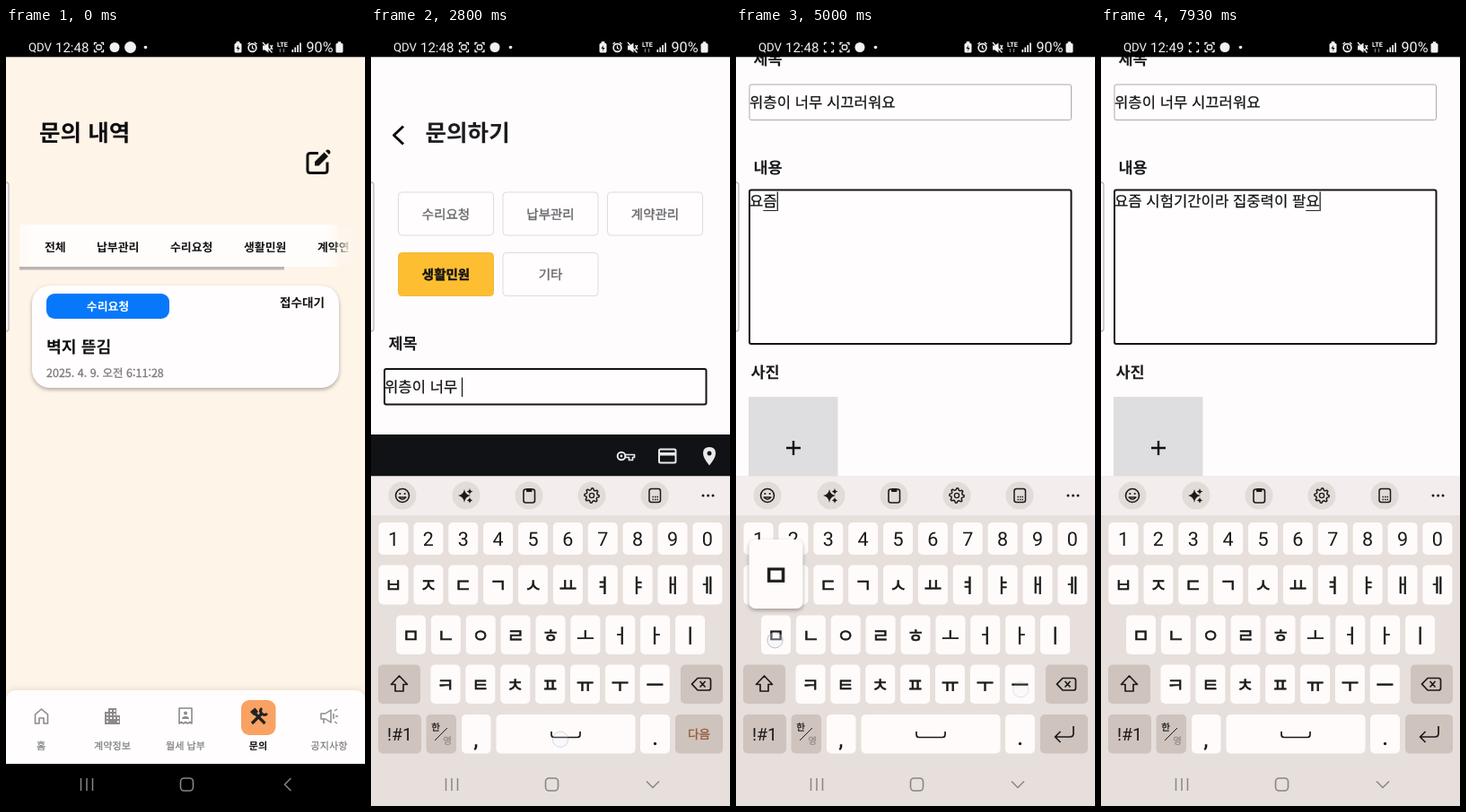
An HTML page for the animation above (8000 ms loop, 400x867 px).

```html
<!DOCTYPE html>
<html lang="ko">
<head>
<meta charset="utf-8">
<title>문의하기</title>
<style>
html, body { margin: 0; width: 100%; height: 100%; overflow: hidden; background: #000; }
svg { display: block; width: 100%; height: 100%; }
text { font-family: "Noto Sans CJK KR", "Noto Sans CJK JP", "Noto Sans CJK", sans-serif; white-space: pre; text-rendering: geometricPrecision; fill: currentColor; stroke: currentColor; }
.num { font-family: Roboto, "Open Sans", sans-serif; stroke: none; }
.lift { filter: drop-shadow(0 2px 2px rgba(60, 50, 50, .4)); }
</style>
</head>
<body>
<svg id="stage" viewBox="0 0 400 867" preserveAspectRatio="none"></svg>
<script>
const LOOP = 8000;
const $ = id => document.getElementById(id);

// ---- drawing helpers ----
const rect = (x, y, w, h, r, fill, more = '') =>
  `<rect x="${x}" y="${y}" width="${w}" height="${h}" rx="${r}" fill="${fill}" ${more}/>`;
const line = (d, color, w = 1.6, fill = 'none', more = '') =>
  `<path d="${d}" stroke="${color}" stroke-width="${w}" fill="${fill}" stroke-linejoin="round" ${more}/>`;
const fill = (d, color) => `<path d="${d}" fill="${color}" fill-rule="evenodd"/>`;
const dot = (x, y, r, color, more = '') => `<circle cx="${x}" cy="${y}" r="${r}" fill="${color}" ${more}/>`;
// Lighter weights get a hairline stroke, which gives a medium weight.
const text = (s, x, cy, size, color = '#111', weight = 400, anchor = 'start', more = '') =>
  `<text x="${x}" y="${cy + size * .38}" font-size="${size}" color="${color}" font-weight="${weight}" stroke-width="${weight < 700 ? size * (weight - 300) / 8000 : 0}" text-anchor="${anchor}" ${more}>${s}</text>`;
const num = (s, x, cy, size, color, anchor = 'start', more = '') =>
  `<text class="num" x="${x}" y="${cy + size * .356}" font-size="${size}" color="${color}" text-anchor="${anchor}" ${more}>${s}</text>`;
const group = (id, body, more = '') => `<g id="${id}" ${more}>${body}</g>`;

// ---- list page ----
function listPage() {
  const gray = '#8b8a8d';
  const tabs = [['전체', 43], ['납부관리', 101], ['수리요청', 183], ['생활민원', 265], ['계약연', 347]];
  const labels = [['홈', 39], ['계약정보', 118.5], ['월세 납부', 200], ['문의', 281], ['공지사항', 360]];
  return rect(0, 32, 400, 788, 0, '#fef4e8')
    + text('문의 내역', 37, 116, 25.6, '#0d0d10', 700)
    + line('M348 139.500h-9q-3 0-3 3v16q0 3 3 3h16q3 0 3-3v-9', '#111', 3)
    + fill('M344 153.500v-4.500l10.500-10.500 4.500 4.500-10.500 10.500zM356 137l2-1.500q3.500 0 3.500 3.500l-1.500 2z', '#111')
    + rect(15, 219, 355, 47, 2, 'url(#fade)')
    + tabs.map(([s, x]) => text(s, x, 244, 12.9, '#111', 700)).join('')
    + rect(362, 222, 26, 42, 0, 'url(#veil)')
    + rect(15, 266, 295, 3.5, 0, '#bab5b4')
    + rect(29, 287, 342, 114, 20, '#fffdfd', 'class="lift"')
    + rect(45, 296, 137, 28, 9, '#0878fa')
    + text('수리요청', 113.5, 310, 12.9, '#fff', 700, 'middle')
    + text('접수대기', 355, 306, 13.6, '#111', 700, 'end')
    + text('벽지 뜯김', 45, 355, 18.3, '#111', 700)
    + text('2025. 4. 9. 오전 6:11:28', 45, 384, 12.5, '#7d7a7a', 500)
    + rect(0, 738, 400, 100, 11, '#fffdfd', 'style="filter:drop-shadow(0 -2px 3px rgba(120,90,60,.13))"')
    + rect(262, 749, 38.5, 39, 9, '#f9a263')
    + line('M32.500 765l7-6 7 6v10h-4.500v-6h-5v6h-4.500z', gray)
    + fill('M110 762h4v-4h9v8h4v10h-17zM112 764v2h2v-2zM112 768v2h2v-2zM112 772v2h2v-2zM116 760v2h2v-2zM116 764v2h2v-2zM116 768v2h2v-2zM120 760v2h2v-2zM120 764v2h2v-2zM120 768v2h2v-2zM124 768v2h2v-2zM124 772v2h2v-2z', gray)
    + line('M193 758h14v17l-2.300-1.500-2.300 1.500-2.400-1.500-2.400 1.500-2.300-1.500-2.300 1.500z', gray)
    + dot(200, 763.5, 2, gray) + fill('M196 770q0-3 4-3t4 3z', gray)
    + line('M274 775l11-11M277.500 764l11 11', '#222', 3.2)
    + line('M272.500 762l5-4 3 4-4 4z', '#222', 1, '#222')
    + line('M285 758q-3 3 0 6t6 0', '#222', 3)
    + line('M351 764h5l6-4v14l-6-4h-5zM354 770v5M365 764v6M366 761l3-2M367 767h3M366 773l3 2', gray, 1.5)
    + labels.map(([s, x]) => text(s, x, 800, 11.1, s == '문의' ? '#111' : '#777', s == '문의' ? 700 : 400, 'middle')).join('');
}

// ---- form page ----
function formPage() {
  const choice = (s, x, y, id = '') => rect(x, y, 106, 48, 4, '#fffdfe', `stroke="#dddce1" ${id && `id="${id}"`}`)
    + text(s, x + 53, y + 24, 14.5, '#68676b', 500, 'middle', id && `id="${id}Text"`);
  return line('M36 109.500l-10.500 10 10.500 10', '#0d0d10', 3)
    + text('문의하기', 60.5, 116, 25.6, '#1c1c20', 700)
    + choice('수리요청', 30.5, 183) + choice('납부관리', 147, 183) + choice('계약관리', 263.5, 183)
    + choice('생활민원', 30.5, 250.5, 'pick') + choice('기타', 147, 250.5)
    + text('제목', 19.5, 351.5, 17.5, '#1a1a1e', 700)
    + rect(15, 380, 358.5, 39.5, 2, '#fffdfe', 'id="titleBox"')
    + text('내용', 19.5, 472.5, 17.5, '#1a1a1e', 700)
    + rect(15, 497.5, 358.5, 171.5, 2, '#fffdfe', 'id="bodyBox"')
    + text('사진', 16.5, 700.5, 17.5, '#1a1a1e', 700)
    + rect(14, 728, 99.5, 110, 0, '#dedde0')
    + line('M56 785h16M64 777v16', '#111', 2.4)
    + text('', 15, 400, 16.67, '#111', 400, 'start', 'id="titleText"')
    + text('', 15, 510, 16.67, '#111', 400, 'start', 'id="bodyText"')
    + rect(0, 0, 0, 1, 0, '#222', 'id="under"')
    + rect(0, 0, 1.2, 21.5, 0, '#111', 'id="caret"');
}

// ---- keyboard ----
const KEYS = [];
const ROWS = [['1234567890', 25, 551, 36], ['ㅂㅈㄷㄱㅅㅛㅕㅑㅐㅔ', 25, 598.5, 44], ['ㅁㄴㅇㄹㅎㅗㅓㅏㅣ', 44.5, 654.5, 43.5], ['ㅋㅌㅊㅍㅠㅜㅡ', 83, 709.5, 43.5]];
for (const [chars, x0, y, h] of ROWS)
  [...chars].forEach((c, i) => KEYS.push({ c, x: x0 + i * 38.88, y, w: 33, h }));
const addKey = (c, x, y, w, dark) => KEYS.push({ c, x: x + w / 2, y, w, h: 43.5, dark, mute: true });
addKey('⇧', 8, 709.5, 47, true);
addKey('⌫', 345, 709.5, 47, true);
addKey('!#1', 8, 765, 48, true);
addKey('lang', 61.5, 765, 33.5, true);
addKey(',', 101, 765, 32.5);
addKey(' ', 139.5, 765, 155);
addKey('.', 300, 765, 33);
addKey('go', 339, 765, 53, true);

const TENSE = { 'ㅂ': 'ㅃ', 'ㅈ': 'ㅉ', 'ㄷ': 'ㄸ', 'ㄱ': 'ㄲ', 'ㅅ': 'ㅆ', 'ㅐ': 'ㅒ', 'ㅔ': 'ㅖ' };
const keyColor = k => k.dark ? '#cfc3bd' : '#fefbfa';
const keyIndex = c => KEYS.findIndex(k => k.c == c || TENSE[k.c] == c);

function keyboard() {
  const ink = '#1b1a1a';
  const tools = [35, 106, 176, 246, 316].map(x => dot(x, 521, 15.6, '#e3dbd8')).join('');
  const gear = Array.from({ length: 32 }, (_, i) => {
    const a = i / 32 * Math.PI * 2, r = Math.floor(i / 2) % 2 ? 6.2 : 8.2;
    return (246 + r * Math.cos(a)).toFixed(1) + ' ' + (521 + r * Math.sin(a)).toFixed(1);
  }).join('L');
  const caps = KEYS.map((k, i) => rect(k.x - k.w / 2, k.y, k.w, k.h, 5, keyColor(k), `id="k${i}"`)
    + (k.mute ? '' : k.h == 36 ? num(k.c, k.x, 569.5, 21.5, ink, 'middle')
      : text(k.c, k.x, k.y + 22.5, 21.5, ink, 500, 'middle', `id="c${i}"`))).join('');
  return rect(0, 499.5, 400, 368, 0, '#e6dfdc') + rect(0, 499.5, 400, 43.5, 0, '#f3eeed')
    + tools
    + dot(35, 521, 7.5, 'none', `stroke="${ink}" stroke-width="1.6"`) + dot(32.3, 519, 1.1, ink) + dot(37.7, 519, 1.1, ink)
    + line('M31 523q4 4.500 8 0z', ink, 1.3)
    + fill('M104 514q1 6 7 7-6 1-7 8-1-7-7-8 6-1 7-7zM110 513q.5 3 3.500 3.500-3 .5-3.500 3.500-.5-3-3.500-3.500 3-.5 3.500-3.500zM110 523q.5 3 3 3.500-2.500.5-3 3-.5-2.500-3-3 2.500-.5 3-3.500z', ink)
    + rect(170, 514, 12.5, 15, 2.5, 'none', `stroke="${ink}" stroke-width="1.6"`) + rect(173, 513, 6.5, 4, 1, ink)
    + line('M' + gear + 'z', ink, 1.5) + dot(246, 521, 2.6, 'none', `stroke="${ink}" stroke-width="1.4"`)
    + rect(310, 513.5, 12.5, 15, 2.5, 'none', `stroke="${ink}" stroke-width="1.5"`)
    + line('M313.500 522.500h6.500M313.500 525.500h6.500', ink, 1.6, 'none', 'stroke-dasharray="1.5 1"')
    + [370, 375.6, 381].map(x => dot(x, 521, 1.5, ink)).join('')
    + caps
    + line('M31.500 722l9 9.500h-4.500v7.500h-9v-7.500h-4.500z', ink, 1.7)
    + line('M364 724.500h12q2.500 0 2.500 2.500v8.500q0 2.500-2.500 2.500h-12l-6.500-6.800zM366.500 728l6 6.500M372.500 728l-6 6.500', ink, 1.7)
    + num('!#1', 32, 787, 19.5, ink, 'middle')
    + text('한', 72, 779, 10.5, ink, 500, 'middle') + text('영', 85, 794, 10.5, '#8f8680', 400, 'middle')
    + line('M71 794l14-14', ink, 1)
    + num(',', 117, 792, 24, ink, 'middle', 'font-weight="500"') + num('.', 316.5, 790, 24, ink, 'middle', 'font-weight="500"')
    + line('M201 784v3.500q0 3 3 3h26q3 0 3-3v-3.500', ink, 1.7)
    + group('next', text('다음', 365.5, 787, 13.6, '#985a3c', 500, 'middle'))
    + group('enter', line('M376 778v8q0 4-4 4h-16M361.500 784l-6 6 6 6', ink, 1.7));
}

function fillBar() {
  const c = '#e9e9eb';
  return rect(0, 453, 400, 47, 0, '#101216')
    + dot(279, 477, 4.3, 'none', `stroke="${c}" stroke-width="2"`) + dot(279, 477, 1.4, c)
    + line('M283 475.500h10.500v3h-2v3h-4v-3h-4.500', c, 1.7)
    + rect(321, 469.5, 18.5, 15, 1.5, 'none', `stroke="${c}" stroke-width="2"`) + rect(321, 473, 18.5, 3.5, 0, c)
    + fill('M377 467q7 0 7 7 0 5-7 13.500-7-8.500-7-13.500 0-7 7-7zM377 471.500a2.500 2.500 0 1 0 .01 0z', c);
}

function statusBar() {
  const w = '#f2f2f2';
  const frame = (x, p, id) => group(id + 'Out', line(`M${x - p} 19v-2.500h2.500M${x + 10 + p - 2.5} 16.500h2.500v2.500M${x + 10 + p} 24v2.500h-2.500M${x - p + 2.5} 26.500h-2.500v-2.500`, w, 1.3))
    + rect(x + 2.3, 19, 5.4, 5, 1.5, 'none', `stroke="${w}" stroke-width="1.3" id="${id}In"`);
  return rect(0, 0, 400, 32.3, 0, '#000')
    + num('QDV', 25, 21.5, 13.2, w) + num('12:48', 55, 21.5, 15, w, 'start', 'id="clock"')
    + frame(98.5, 0, 'capA')
    + group('early', dot(121, 21.5, 5.5, w) + dot(138.5, 21.5, 6.5, w))
    + group('later', frame(116, 0, 'capB') + dot(138, 21.5, 5.5, w))
    + dot(155.5, 21.5, 1.8, w)
    + rect(254.5, 17, 8, 10.5, 1.5, w) + rect(256.5, 15, 4, 3, 1, w) + fill('M259 19l-2.500 4h2l-.5 3 2.500-4h-2z', '#000')
    + dot(274.5, 22, 4.4, 'none', `stroke="${w}" stroke-width="1.6"`) + line('M274.500 19.500v3l2 1M269.500 18l2.500-2M279.500 18l-2.500-2', w, 1.3)
    + fill('M286 19.500h2.500l4-3v11l-4-3h-2.500z', w) + line('M286 16l10.500 11.500M294.500 19l2.500 5M297 19l-2.500 5', w, 1.3)
    + num('LTE', 302, 18.2, 7.4, w, 'start', 'font-weight="700"')
    + line('M305.500 23v4M309.500 23v4', '#777', 1.4)
    + [0, 1, 2, 3].map(i => rect(318.5 + i * 2.9, 24 - i * 2.5, 1.7, 3 + i * 2.5, 0, w)).join('')
    + num('90%', 334.5, 21.5, 16.2, w)
    + rect(367.5, 17, 8, 10.5, 1.5, w) + rect(369.7, 15.2, 3.6, 3, .5, w);
}

const systemNav = () => line('M83.500 836v14M90 836v14M96.500 836v14', '#8a8584', 1.5)
  + rect(194.5, 836, 14, 14, 4, 'none', 'stroke="#8a8584" stroke-width="1.6"')
  + group('back', line('M317.500 836l-7 7 7 7', '#8a8584', 1.5))
  + group('hide', line('M307 839.500l7 7 7-7', '#8a8584', 1.5));

$('stage').innerHTML = `<defs>
  <linearGradient id="fade"><stop offset="0" stop-color="#fffaf5"/><stop offset=".06" stop-color="#fffdfc"/><stop offset=".95" stop-color="#fffdfc"/><stop offset="1" stop-color="#fff9f2"/></linearGradient>
  <linearGradient id="veil"><stop offset="0" stop-color="#fffaf5" stop-opacity="0"/><stop offset=".9" stop-color="#fef6ec"/></linearGradient></defs>`
  + rect(0, 0, 400, 867, 0, '#fffcfd')
  + group('list', listPage()) + group('form', formPage())
  + rect(396, 0, 4, 0, 0, '#c2c1c3', 'id="thumb"')
  + rect(0, 820, 400, 47, 0, '#000')
  + group('bar', fillBar()) + group('keys', keyboard()) + systemNav() + statusBar()
  + rect(-8, 172, 11, 166, 3, '#fbf9f9', 'stroke="#b9b7b8" stroke-width="1.3"')
  + group('pop', rect(0, 0, 60, 77, 7, '#fefbfa', 'class="lift"')
    + text('', 30, 39, 33, '#1b1a1a', 500, 'middle', 'id="popText"'))
  + group('touches', '');

// ---- Hangul input ----
const LEAD = 'ㄱㄲㄴㄷㄸㄹㅁㅂㅃㅅㅆㅇㅈㅉㅊㅋㅌㅍㅎ';
const VOWEL = 'ㅏㅐㅑㅒㅓㅔㅕㅖㅗㅘㅙㅚㅛㅜㅝㅞㅟㅠㅡㅢㅣ';
const TAIL = ' ㄱㄲㄳㄴㄵㄶㄷㄹㄺㄻㄼㄽㄾㄿㅀㅁㅂㅄㅅㅆㅇㅈㅊㅋㅌㅍㅎ';
const MERGE = { 'ㅜㅣ': 'ㅟ', 'ㅜㅓ': 'ㅝ' };

function syllable({ l, v, t }) {
  if (!v) return l;
  return String.fromCharCode(0xAC00 + (LEAD.indexOf(l) * 21 + VOWEL.indexOf(v)) * 28 + (t ? TAIL.indexOf(t) : 0));
}

function compose(presses) {
  let done = '', cur = { l: '', v: '', t: '' };
  const flush = l => { done += syllable(cur); cur = { l, v: '', t: '' }; };
  return presses.map(({ c, at }) => {
    if (c == ' ') { flush(''); done += ' '; }
    else if (VOWEL.includes(c)) {
      if (cur.t) { const l = cur.t; cur.t = ''; flush(l); cur.v = c; }
      else cur.v = cur.v ? MERGE[cur.v + c] : c;
    } else if (c != '⇧') {
      if (cur.v && !cur.t) cur.t = c; else flush(c);
    }
    return { at: at + 45, done, live: syllable(cur) };
  });
}

const run = (chars, start, step) => [...chars].map((c, i) => ({ c, at: start + i * step }));
const titleKeys = [...run('ㅇㅜㅣㅊㅡㅇㅇㅣ ㄴㅓㅁㅜ ', 1640, 81.5), ...run('ㅅㅣ⇧ㄲㅡㄹㅓㅇㅜㅓㅇㅛ', 2830, 68)];
const bodyKeys = [...run('ㅇㅛㅈㅡㅁ', 4740, 48), ...run(' ㅅㅣㅎㅓㅁㄱㅣㄱㅏㄴㅇㅣㄹㅏ ㅈㅣㅂ', 5030, 85), ...run('ㅈㅜㅇㄹㅕㄱㅇㅣ ㅍㅏㄹㅇㅛ', 6640, 85)];
const titleSteps = compose(titleKeys), bodySteps = compose(bodyKeys);
const presses = [...titleKeys, ...bodyKeys].map((p, i) => {
  const key = keyIndex(p.c), k = KEYS[key];
  return { ...p, key, x: k.x + i * 37 % 13 - 6, y: k.y + k.h / 2 + 6 };
});
const shiftOn = presses.find(p => p.c == '⇧').at + 45, shiftOff = presses.find(p => p.c == 'ㄲ').at + 50;
const taps = [...presses, { at: 70, x: 348, y: 152 }, { at: 740, x: 84, y: 277 }, { at: 1130, x: 190, y: 402 }, { at: 4050, x: 200, y: 250 }];

// ---- timeline ----
const SCROLL = [[3640, 0], [3720, 8], [3790, 24], [3840, 24], [3870, 130], [3930, 240], [3990, 295], [4060, 317]];
function track(steps, t) {
  if (t <= steps[0][0]) return steps[0][1];
  const i = steps.findIndex(s => s[0] >= t);
  if (i < 0) return steps[steps.length - 1][1];
  const [a, va] = steps[i - 1], [b, vb] = steps[i];
  return va + (vb - va) * (t - a) / (b - a);
}
const lengthOf = (node, n) => n ? node.getSubStringLength(0, n) : 0;
const set = (id, attrs) => { for (const a in attrs) $(id).setAttribute(a, attrs[a]); };
const show = (id, on) => $(id).style.display = on ? '' : 'none';
const ring = (x, y, o) => dot(x, y, 8.6, 'rgba(232,238,250,.45)', `stroke="#9a9fac" stroke-width=".9" opacity="${o}"`);
const EMPTY = { done: '', live: '' };
const latest = (steps, t) => steps.filter(s => s.at <= t).pop() || EMPTY;

function render(t) {
  const onForm = t >= 250, picked = t >= 810, inBody = t >= 4120, inTitle = t >= 1200 && !inBody;
  const barOn = t >= 1450 && t < 4190, scroll = track(SCROLL, t);
  show('list', !onForm);
  show('form', onForm);
  set('form', { transform: `translate(0 ${-scroll})` });
  set('pick', { fill: picked ? '#fdbe32' : '#fffdfe', stroke: picked ? '#f0b740' : '#dddce1' });
  set('pickText', { color: picked ? '#111' : '#68676b', 'font-weight': picked ? 700 : 500 });
  for (const [id, on] of [['titleBox', inTitle], ['bodyBox', inBody]])
    set(id, { stroke: on ? '#15141a' : '#aaa9ad', 'stroke-width': on ? 2 : 1 });

  const title = latest(titleSteps, t), body = latest(bodySteps, t);
  $('titleText').textContent = title.done + title.live;
  $('bodyText').textContent = body.done + body.live;
  const now = inBody ? body : title, cy = inBody ? 510 : 400;
  const node = $(inBody ? 'bodyText' : 'titleText');
  const start = lengthOf(node, now.done.length), end = lengthOf(node, (now.done + now.live).length);
  set('under', { x: 15 + start, y: cy + 10, width: end - start });
  set('caret', { x: 15 + end, y: cy - 10.5 });
  show('under', inTitle || inBody);
  show('caret', (inTitle || inBody) && !(t > 4540 && t < 4780));

  const view = barOn ? 420 : 467;
  set('thumb', { y: 33 + scroll * view / 1014, height: view * view / 1014, opacity: t < 3650 ? 0 : Math.max(0, Math.min(1, (4330 - t) / 120)) });

  const rise = Math.max(0, Math.min(1, (t - 1230) / 260));
  set('keys', { transform: `translate(0 ${368 * (1 - rise) ** 3})` });
  show('keys', rise > 0);
  show('bar', barOn);
  show('back', rise < .5);
  show('hide', rise >= .5);
  show('next', t < 4120);
  show('enter', t >= 4120);

  const shifted = t >= shiftOn && t < shiftOff;
  const held = presses.filter(p => t >= p.at && t < p.at + 50).map(p => p.key);
  KEYS.forEach((k, i) => {
    set('k' + i, { fill: held.includes(i) ? '#bba99f' : keyColor(k) });
    if (TENSE[k.c]) $('c' + i).textContent = shifted ? TENSE[k.c] : k.c;
  });
  const top = presses.filter(p => t >= p.at && t < p.at + 95 && !KEYS[p.key].mute).pop();
  show('pop', top);
  if (top) {
    const k = KEYS[top.key], x = Math.max(7, Math.min(332, k.x - 30));
    set('pop', { transform: `translate(${x} ${k.y - 84.5})` });
    $('popText').textContent = top.c;
  }

  let rings = taps.filter(p => t >= p.at && t < p.at + 150)
    .map(p => ring(p.x, p.y, Math.min(1, (p.at + 150 - t) / 110))).join('');
  if (t > 3620 && t < 3880) rings += ring(342, 318 - scroll, Math.min(1, (3880 - t) / 50));
  $('touches').innerHTML = rings;

  $('clock').textContent = t < 7000 ? '12:48' : '12:49';
  show('early', !onForm);
  show('later', onForm);
  const phase = ((t - 5000) / 977 % 1 + 1) % 1;
  show('capAIn', !onForm || (phase > .3 && phase < .9));
}

const began = performance.now();
function tick() {
  render((performance.now() - began) % LOOP);
  requestAnimationFrame(tick);
}
tick();
</script>
</body>
</html>
```
